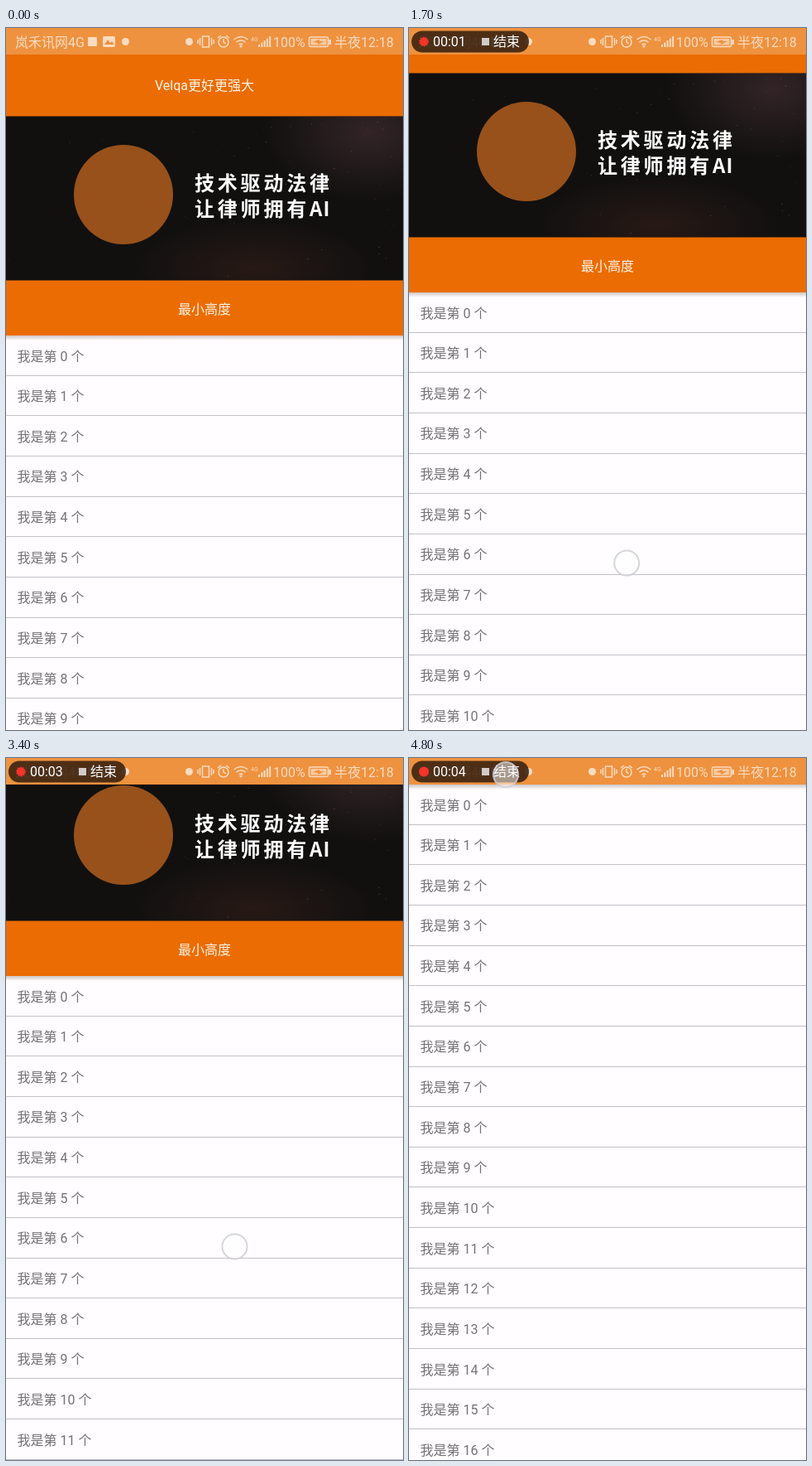
Write an HTML page that moves like this. It is 480x847 px and loops after 4900 ms.

```html
<!DOCTYPE html>
<html lang="zh-CN">
<head>
<meta charset="utf-8">
<title>Scrolling list</title>
<style>
  html, body { margin: 0; width: 100%; height: 100%; overflow: hidden; background: #fffdff; }
  svg { display: block; width: 100%; height: 100%; }
  text { font: 16px Roboto, "Noto Sans CJK SC", "Noto Sans CJK", sans-serif; white-space: pre; }
  .title { fill: #fff4ea; text-anchor: middle; }
  .slogan { font: bold 24px "Noto Sans CJK SC", "Noto Sans CJK", sans-serif; letter-spacing: 3.8px; fill: #fff; }
  .row text { fill: #747276; }
  .row rect { fill: #c3c1c7; shape-rendering: crispEdges; }
  .status { fill: #fbdcc2; }
  .line { fill: none; stroke: #fbdcc2; stroke-width: 1.5; }
  .pill text { fill: #fff; }
</style>
</head>
<body>
<svg viewBox="0 0 480 847">
  <defs>
    <linearGradient id="shade" x2="0" y2="1">
      <stop stop-color="#5a4030" stop-opacity=".3"/>
      <stop offset="1" stop-color="#5a4030" stop-opacity="0"/>
    </linearGradient>
    <radialGradient id="dust">
      <stop stop-color="#4a3236" stop-opacity=".6"/>
      <stop offset="1" stop-color="#4a3236" stop-opacity="0"/>
    </radialGradient>
    <radialGradient id="ember">
      <stop stop-color="#3a211b" stop-opacity=".55"/>
      <stop offset="1" stop-color="#3a211b" stop-opacity="0"/>
    </radialGradient>
    <clipPath id="bannerClip"><rect y="106.5" width="480" height="198"/></clipPath>
  </defs>

  <rect width="480" height="847" fill="#fffdff"/>

  <g id="page">
    <g id="rows"></g>
    <rect y="371" width="480" height="6" fill="url(#shade)"/>
    <rect width="480" height="371" fill="#eb6c02"/>
    <text class="title" x="240" y="75">Velqa更好更强大</text>
    <g clip-path="url(#bannerClip)">
      <rect y="106" width="480" height="199" fill="#11100f"/>
      <ellipse cx="440" cy="125" rx="130" ry="85" fill="url(#dust)"/>
      <ellipse cx="300" cy="290" rx="150" ry="60" fill="url(#ember)"/>
      <g id="stars" fill="#a08078"></g>
      <circle cx="142" cy="201" r="60" fill="#98511b"/>
      <text class="slogan" x="228" y="195.5">技术驱动法律</text>
      <text class="slogan" x="228" y="226.5">让律师拥有<tspan letter-spacing="1" style="letter-spacing:1px">AI</tspan></text>
    </g>
    <text class="title" x="240" y="344.5">最小高度</text>
  </g>

  <rect width="480" height="32" fill="#ee923f"/>
  <g class="status">
    <text x="11" y="22.5">岚禾讯网4G</text>
    <rect x="99" y="11" width="11" height="11" rx="1"/>
    <rect x="117" y="10" width="15" height="13" rx="2"/>
    <path d="M119 20l4-6 3 4 2-2 3 4z" fill="#ee923f"/>
    <circle cx="144.500" cy="16.500" r="4.500"/>
    <circle cx="221.500" cy="16.500" r="4.500"/>
    <path class="line" d="M237.500 10h8v13h-8zM234.500 12v9M248.500 12v9M232 14v5M251 14v5"/>
    <circle class="line" cx="263" cy="17" r="6"/>
    <path class="line" d="M263 13v4l3 2M256 12l4-3M270 12l-4-3"/>
    <path class="line" d="M275.500 14q8.500-7 17 0M278.500 17.200q5.500-4.500 11 0M281.500 20q2.500-2 5 0"/>
    <circle cx="284" cy="22" r="1.500"/>
    <text x="296" y="15.500" style="font-size:7px">4G</text>
    <path class="line" style="stroke-width:2" d="M306 23v-3M309.300 23v-5.500M312.600 23v-8M315.900 23v-10.500M319.200 23v-13"/>
    <text x="323" y="22.500">100%</text>
    <rect class="line" x="366.500" y="11" width="23" height="11.500" rx="2"/>
    <rect x="368.500" y="13" width="19" height="7.500" opacity=".75"/>
    <rect x="390.500" y="14" width="2.500" height="6"/>
    <path d="M371 17l8-3v2h6l-8 4v-2z" fill="#ee923f"/>
    <text x="397" y="22.500">半夜12:18</text>
  </g>

  <g id="pill" class="pill">
    <rect x="3" y="3.500" width="142" height="26" rx="13" fill="#35200f" fill-opacity=".87"/>
    <circle id="dot" cx="18" cy="16.500" r="5" fill="#f5342a" stroke="#f5342a" stroke-width="2"/>
    <text id="clock" x="29" y="22"></text>
    <rect x="88" y="12" width="9" height="9" fill="#d2ccc8"/>
    <text x="102" y="22.300">结束</text>
  </g>

  <circle id="touch" r="15" fill="#fff" fill-opacity=".5" stroke="#cfced6" stroke-opacity=".85" stroke-width="2"/>
</svg>
<script>
const LOOP = 4900, STEP = 100, ROW = 48.65, LIST_TOP = 371;
const $ = id => document.getElementById(id);

// [time, value...] tracks, joined by straight lines
const scroll = [[400, 0], [600, 15], [1200, 66], [1450, 84], [2100, 0],
  [2300, 0], [2900, 47], [3900, 168], [4400, 339]];
const drag = [[300, 250, 698], [600, 253, 676], [1200, 262, 629], [1450, 264, 611], [2100, 262, 701],
  [2300, 263, 701], [2900, 267, 647], [3900, 286, 532], [4400, 296, 361]];
const ticks = [500, 2000, 3000, 4000];

function sample(track, t) {
  const next = track.findIndex(p => p[0] > t);
  if (next === 0) return track[0].slice(1);
  if (next < 0) return track[track.length - 1].slice(1);
  const a = track[next - 1], b = track[next];
  const k = (t - a[0]) / (b[0] - a[0]);
  return a.slice(1).map((v, i) => v + (b[i + 1] - v) * k);
}

function buildRows() {
  let html = '';
  for (let i = 0; i < 18; i++) {
    const y = LIST_TOP + i * ROW;
    html += `<g class="row"><text x="13.5" y="${y + 30.5}">我是第 ${i} 个</text>` +
      `<rect y="${Math.round(y + ROW - 1)}" width="480" height="1"/></g>`;
  }
  $('rows').innerHTML = html;
}

function buildStars() {
  let seed = 7, html = '';
  const rand = () => (seed = seed * 16807 % 2147483647) / 2147483647;
  for (let i = 0; i < 70; i++) {
    const x = 480 * Math.sqrt(rand()), y = 106 + 198 * rand() ** 1.5;
    html += `<circle cx="${x.toFixed(1)}" cy="${y.toFixed(1)}" r=".6" opacity="${(rand() * .5).toFixed(2)}"/>`;
  }
  $('stars').innerHTML = html;
}

const show = (el, on) => el.setAttribute('visibility', on ? 'visible' : 'hidden');

function draw(t) {
  $('page').setAttribute('transform', `translate(0 ${-Math.round(sample(scroll, t)[0])})`);

  const recording = t >= 100;
  show($('pill'), recording);
  show($('dot'), recording && t >= 1700);
  $('dot').setAttribute('stroke-dasharray', t < 4300 ? '1.6 1.5' : 'none');
  $('clock').textContent = '00:0' + ticks.filter(s => t >= s).length;

  const tapping = t >= 4600;
  const [x, y] = tapping ? [117, 20] : sample(drag, t);
  show($('touch'), tapping || (t >= 300 && t <= 4400));
  $('touch').setAttribute('transform', `translate(${x} ${y})`);
}

buildRows();
buildStars();
const start = performance.now();
function frame() {
  const t = (performance.now() - start) % LOOP;
  draw(Math.floor(t / STEP) * STEP);
  requestAnimationFrame(frame);
}
frame();
</script>
</body>
</html>
```
